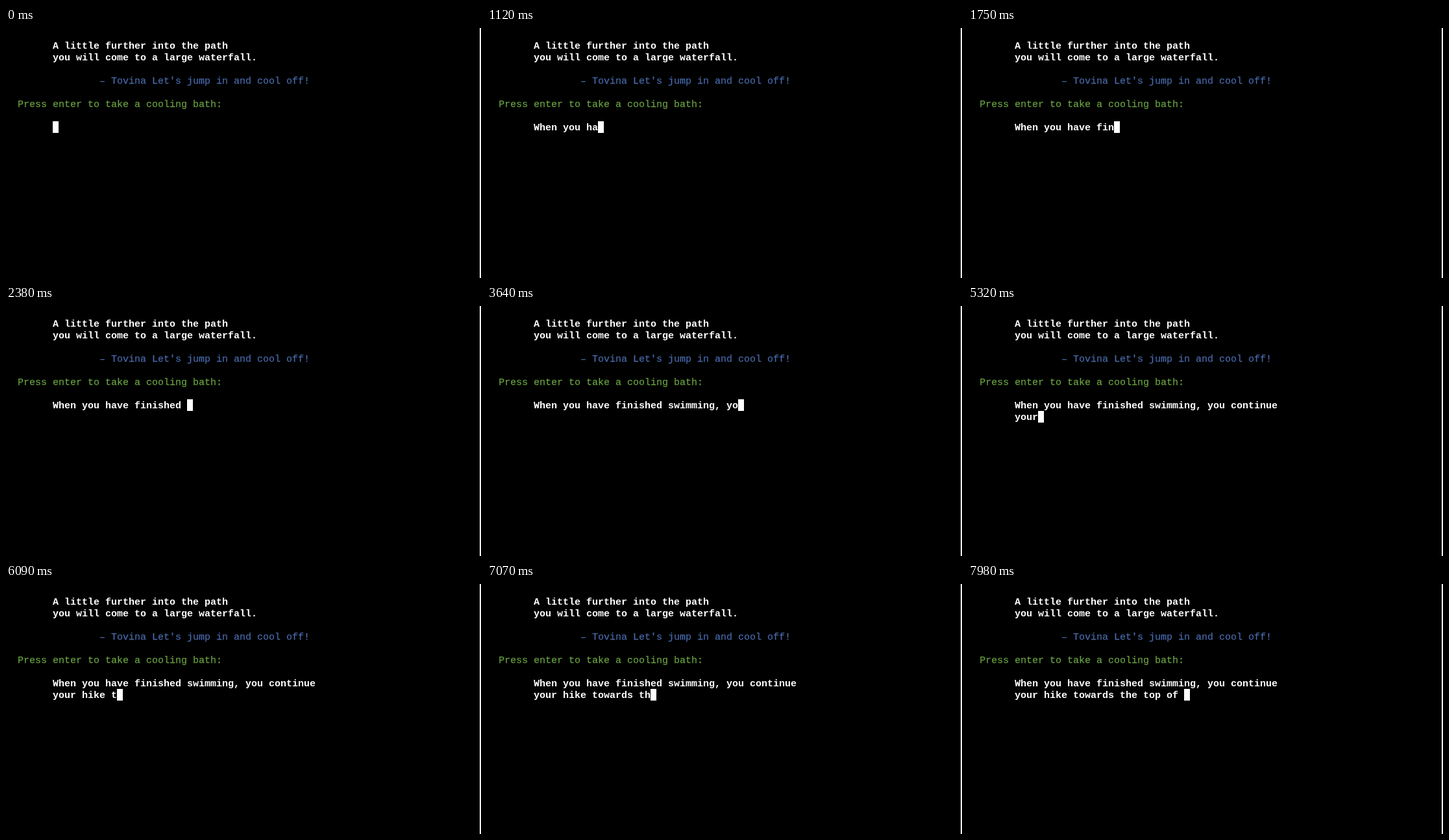
An HTML page that plays this animation: 732 by 386 pixels, repeating every 8 s.

```html
<!DOCTYPE html>
<html lang="en">
<head>
<meta charset="utf-8">
<title>Waterfall</title>
<style>
  html, body { margin: 0; width: 100%; height: 100%; overflow: hidden; background: #000; }
  svg { display: block; width: 732px; height: 386px; }
  text { font: 15px "Liberation Mono", "Courier New", monospace; white-space: pre; }
  .story { fill: #fff; font-weight: bold; }
  .speech { fill: #4868a8; stroke: #4868a8; stroke-width: 0.25px; }
  .prompt { fill: #68a040; stroke: #68a040; stroke-width: 0.25px; }
</style>
</head>
<body>
<svg id="screen" viewBox="0 0 732 386">
  <rect width="732" height="386" fill="#fff"/>
  <rect width="730" height="386" fill="#000"/>
</svg>
<script>
const COL = 9, ROW = 18, INDENT = 8;
const LOOP = 8000, TICK = 70, LATE_TICK = 88;
const STORY = "When you have finished swimming, you continue\n\tyour hike towards the top of ";
const screen = document.getElementById("screen");

function add(tag, attrs) {
  const el = document.createElementNS("http://www.w3.org/2000/svg", tag);
  for (const key in attrs) el.setAttribute(key, attrs[key]);
  return screen.appendChild(el);
}

function line(col, row, style, content = "") {
  const el = add("text", { x: col * COL, y: row * ROW + 14, class: style });
  el.textContent = content;
  return el;
}

line(8, 1, "story", "A little further into the path");
line(8, 2, "story", "you will come to a large waterfall.");
line(16, 4, "speech", "– Tovina Let's jump in and cool off!");
line(2, 6, "prompt", "Press enter to take a cooling bath:");

const typed = [line(INDENT, 8, "story"), line(INDENT, 9, "story")];
const cursor = add("rect", { width: COL, height: ROW, fill: "#fff" });

// Two characters every three ticks, with one half-step delay late in the loop.
function typedCount(time) {
  const tick = Math.floor(time / TICK);
  return tick < LATE_TICK ? Math.ceil((tick + 1) / 1.5) - 1 : Math.floor(tick / 1.5);
}

function draw(now) {
  const [first, second] = STORY.slice(0, typedCount(now % LOOP)).split("\n");
  const wrapped = second !== undefined;
  const tail = wrapped ? second.replace("\t", "") : first;
  const col = second === "" ? 0 : INDENT + tail.length;

  typed[0].textContent = first;
  typed[1].textContent = wrapped ? tail : "";
  cursor.setAttribute("x", col * COL);
  cursor.setAttribute("y", (wrapped ? 9 : 8) * ROW);
}

const start = performance.now();
function loop() {
  draw(performance.now() - start);
  requestAnimationFrame(loop);
}
loop();
</script>
</body>
</html>
```
